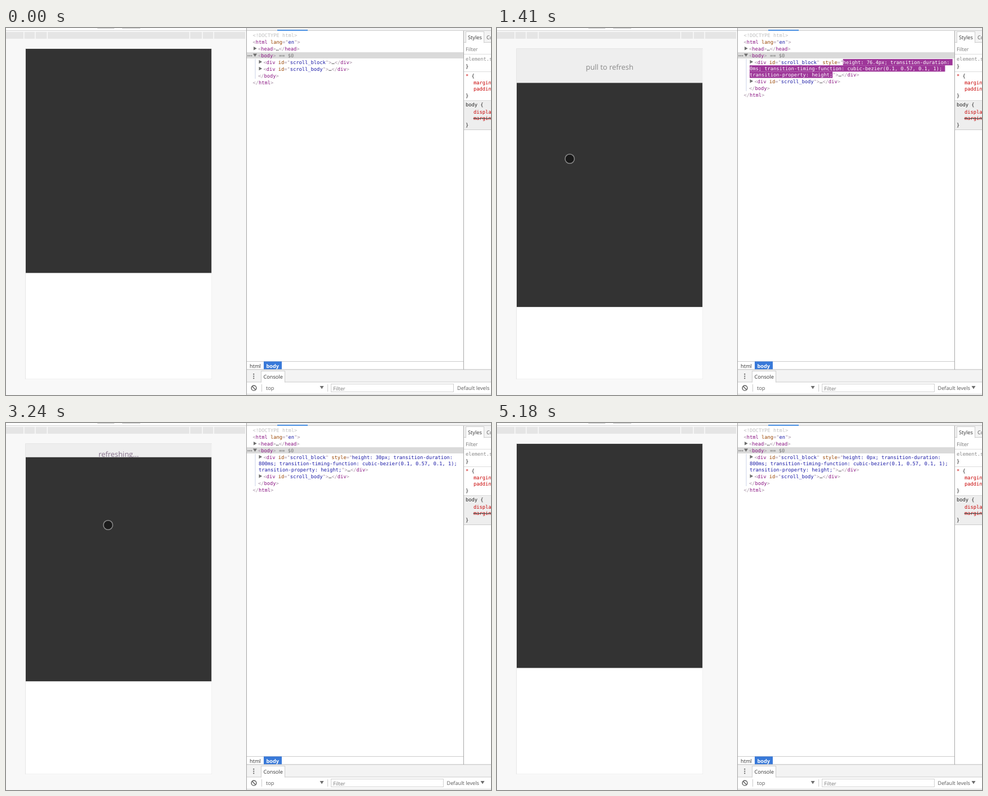
Recreate the animation shown at these times as an HTML page. Size 860 px wide and 651 px high, loop 5240 ms.

```html
<!DOCTYPE html>
<html lang="en">
<head>
<meta charset="utf-8">
<title>Pull to refresh</title>
<style>
html, body { margin: 0; width: 100%; height: 100%; overflow: hidden; background: #fff; }
svg { display: block; width: 860px; height: 651px; }
text { white-space: pre; text-rendering: geometricPrecision; }
.mono { font: 8.72px "DejaVu Sans Mono", monospace; }
.ui { font: 9.2px "Open Sans", "Noto Sans", sans-serif; fill: #5a5a5a; }
.note { font: 12.9px "Open Sans", "Noto Sans", sans-serif; text-anchor: middle; }
</style>
</head>
<body>
<svg id="stage" viewBox="0 0 860 651"></svg>
<script>
const LOOP = 5240;
const CELL = 5.25;
const SCALE = 0.79;
const TOP = 37;
const BODY = 397.5;
const PUNCT = '#a894a6', TAG = '#881280', ATTR = '#994500', VALUE = '#1a1aa6', DARK = '#303030';

// ---------- drawing helpers ----------
const esc = s => s.replace(/&/g, '&amp;').replace(/</g, '&lt;').replace(/>/g, '&gt;');
const rect = (x, y, w, h, fill, more = '') =>
  `<rect x="${x}" y="${y}" width="${w}" height="${h}" fill="${fill}" ${more}/>`;
const ui = (x, y, s, more = '') => `<text class="ui" x="${x}" y="${y}" ${more}>${esc(s)}</text>`;
const span = ([color, s]) => `<tspan fill="${color}">${esc(s)}</tspan>`;
const code = (x, y, parts, more = '') =>
  `<text class="mono" x="${x}" y="${y}" ${more}>${parts.map(span).join('')}</text>`;
const right = (x, y) => `<path d="M${x} ${y - 3.2}l5.6 3.2l-5.6 3.2z" fill="#6e6e6e"/>`;
const down = (x, y, w = 7, h = 5.5) => `<path d="M${x} ${y}h${w}l${-w / 2} ${h}z" fill="#6e6e6e"/>`;

const open = (name, attr, value) => [
  [PUNCT, '<'], [TAG, name],
  ...(attr ? [[ATTR, ' ' + attr], [PUNCT, '="'], [VALUE, value], [PUNCT, '"']] : []),
  [PUNCT, '>']
];
const close = name => [[PUNCT, '</'], [TAG, name], [PUNCT, '>']];
const folded = (name, attr, value) => [...open(name, attr, value), [DARK, '…'], ...close(name)];

// ---------- static interface ----------
function devicePane() {
  const gaps = [31, 51, 72.5, 325, 347.5, 367.5];
  return rect(0, 0, 426, 651, '#f8f8f8') +
    rect(0, 0, 426, 4, '#fdfdfd') + rect(0, 4, 426, 1, '#d6d6d6') +
    rect(162, 0, 30, 1, '#c4c4c4') + rect(206, 0, 32, 1, '#c4c4c4') +
    rect(0, 7, 424, 12, '#e5e5e5') +
    gaps.map(x => rect(x, 7, 1.5, 12, '#fafafa')).join('') +
    rect(34, 36, 331, 587, '#e6e6e6') +
    rect(35, TOP, 329.5, 585.5, '#fff');
}

function stylesPane() {
  const rule = (x, y, s, color) => code(x, y, [[color, s]]);
  const red = '#c80000', gray = '#888', ink = '#222';
  return rect(811, 5, 49, 601, '#fff') +
    rect(812, 5, 48, 20.5, '#f3f3f3') + rect(812, 25, 48, 1, '#ccc') +
    rect(815.5, 6.5, 32, 19.5, '#fff', 'stroke="#ccc"') + rect(816, 25, 31, 2, '#fff') +
    ui(819, 20, 'Styles', 'style="fill:#333"') + ui(852, 20, 'Computed') +
    ui(815, 40.5, 'Filter', 'style="fill:#777"') + rect(812, 46, 48, 1, '#ddd') +
    rule(815, 58, 'element.style {', gray) + rule(815, 71, '}', ink) + rect(812, 77, 48, 1, '#ddd') +
    rule(815, 88, '*', red) + rule(825.5, 88, '{', ink) +
    rule(829, 100, 'margin:', red) + rule(829, 111, 'padding:', red) + rule(815, 122.5, '}', ink) +
    rect(812, 128, 48, 52, '#eee') + rect(812, 128, 48, 1, '#ddd') + rect(812, 180, 48, 1, '#ccc') +
    rule(815, 139, 'body {', ink) + rule(829, 152, 'display:', red) +
    rule(829, 163, 'margin:', red) + rect(828.5, 160, 32, 1, '#333') + rule(815, 174.5, '}', ink) +
    rect(811, 5, 1, 601, '#a8a8a8');
}

function toolsPane() {
  return rect(426, 0, 434, 651, '#fff') +
    rect(427, 0, 433, 4, '#f3f3f3') + rect(427, 4, 433, 1, '#ccc') + rect(481, 3, 54, 2, '#4a90e2') +
    rect(427, 43, 384, 11, '#dadada') +
    [429.5, 432.5, 435.5].map(x => rect(x - 1, 48.5, 1.6, 1.6, '#666')).join('') +
    code(437.5, 16, [['#c0c0c0', '<!DOCTYPE html>']]) +
    code(437.5, 28, open('html', 'lang', 'en')) +
    right(439, 36.3) + code(447, 40, folded('head')) +
    down(438, 45.5) + code(447, 51.5, open('body')) +
    code(484, 51.5, [['#777', '== $0']], 'font-style="italic"') +
    stylesPane() +
    rect(427, 591, 384, 1, '#ccc') + ui(432, 602.5, 'html', 'style="fill:#333"') +
    rect(457, 591.5, 32, 14, '#3879d9') +
    ui(461.5, 602.5, 'body', 'style="fill:#fff;font-weight:700"') +
    rect(427, 605.5, 433, 1, '#a3a3a3') + rect(427, 606.5, 433, 21.5, '#f3f3f3') +
    rect(427, 627.5, 433, 1, '#ccc') +
    [613, 616.7, 620.4].map(y => rect(438.3, y, 1.9, 1.9, '#5a5a5a')).join('') +
    rect(452.5, 608.5, 42, 19.5, '#fff', 'stroke="#ccc"') + rect(453, 627, 41, 2, '#fff') +
    ui(456.5, 621.5, 'Console', 'style="fill:#333"') +
    '<g fill="none" stroke="#5a5a5a" stroke-width="1.4"><circle cx="439.5" cy="638.7" r="4.4"/><path d="M436.4 635.6l6.2 6.2"/></g>' +
    rect(453, 632, 1, 13, '#ccc') + ui(461, 642, 'top') + down(556.5, 635) +
    rect(570, 632, 1, 13, '#ccc') + rect(427, 649, 433, 1, '#d0d0d0') +
    rect(426, 0, 1, 651, '#a3a3a3');
}

const guide = h => rect(441.5, 55, 1, h, '#cbd3ea');
const filterBox = w =>
  rect(576.5, 631.5, w, 14, '#fff', 'stroke="#d0d0d0"') + ui(580, 642.5, 'Filter', 'style="fill:#777"');

function plainTree() {
  return guide(35) +
    right(448.5, 60) + code(456.5, 63.5, folded('div', 'id', 'scroll_block')) +
    right(448.5, 72) + code(456.5, 75.5, folded('div', 'id', 'scroll_body')) +
    code(447, 87.5, close('body')) + code(437.5, 99.5, close('html')) +
    filterBox(217) + ui(800, 642, 'Default levels');
}

function styledTree() {
  const head = [...open('div', 'id', 'scroll_block').slice(0, -1), [ATTR, ' style'], [PUNCT, '="']];
  const tail = [[PUNCT, '">'], [DARK, '…'], ...close('div')];
  const line = (i, x, y) => rect(x, y - 8.5, 0, 11.2, 'none', `id="mark${i}"`) +
    `<text class="mono" id="line${i}" x="${x}" y="${y}"></text>`;
  return guide(57) +
    right(448.5, 60) + code(456.5, 63.5, head) +
    line(0, 613.5, 63.5) + line(1, 448, 74.7) + line(2, 448, 85.9) +
    code(448 + 28 * CELL, 85.9, tail) +
    right(448.5, 94.3) + code(456.5, 98, folded('div', 'id', 'scroll_body')) +
    code(447, 110, close('body')) + code(437.5, 121.5, close('html')) +
    filterBox(199) + ui(781.5, 642, 'Default levels') + down(841.5, 635);
}

document.getElementById('stage').innerHTML =
  '<clipPath id="screen"><rect x="35" y="37" width="329.5" height="585.5"/></clipPath>' +
  devicePane() +
  '<g clip-path="url(#screen)">' +
  rect(35, TOP, 329.5, 0, '#eee', 'id="block"') +
  '<text class="note" id="note" x="199.7"></text>' +
  rect(35, TOP, 329.5, BODY, '#333', 'id="page"') + '</g>' +
  toolsPane() +
  `<g id="plain">${plainTree()}</g><g id="styled">${styledTree()}</g>` +
  '<circle id="touch" r="8.3" fill="#141414" fill-opacity=".75" stroke="#8a8a8a" stroke-width="1.5"/>' +
  '<path id="arrow" d="M0 0v15l3.5-3.2l2.4 5.4l2.2-1l-2.4-5.2h4.8z" fill="#fff" stroke="#000" stroke-width=".9"/>';

// ---------- motion ----------
const spread = (a, b, n) => Array.from({ length: n }, (_, i) => a + (b - a) * i / (n - 1));

const TICKS = [
  0, ...spread(70, 540, 7), 600, 650, 810, ...spread(1060, 1410, 6), 1540, 1680,
  ...spread(1820, 1960, 4), 2140, 2210, 2390, 2550, 2650, 2880, 3180, 3240,
  3730, 3820, 3900, 4000, ...spread(4160, 4660, 8), 4830, 4950, 5130, 5180
];

// pointer path: time, x, y
const PATH = [
  [70, 728, 634], [540, 119, 89], [600, 109, 82], [650, 103, 77], [1000, 103, 77],
  [1410, 129, 232], [1540, 149, 211], [1680, 181, 181], [4080, 181, 181], [4600, 726, 628]
];

const RELEASE = 1680, FINISH = 3635, GLIDE = 800, FLASH = 1400;
const clamp = v => Math.max(0, Math.min(1, v));
const mix = (a, b, k) => a + (b - a) * k;
const rgb = (a, b, k) => `rgb(${a.map((v, i) => Math.round(mix(v, b[i], k))).join()})`;

function bezier(x1, y1, x2, y2) {
  const at = (a, b, u) => 3 * (1 - u) ** 2 * u * a + 3 * (1 - u) * u * u * b + u ** 3;
  return x => {
    let lo = 0, hi = 1;
    for (let i = 0; i < 24; i++) {
      const mid = (lo + hi) / 2;
      if (at(x1, x2, mid) < x) lo = mid; else hi = mid;
    }
    return at(y1, y2, lo);
  };
}
const glide = bezier(0.1, 0.57, 0.1, 1);
const ease = bezier(0.25, 0.1, 0.25, 1);

function pointer(t) {
  let i = PATH.findIndex(p => p[0] > t);
  if (i < 0) i = PATH.length;
  const a = PATH[Math.max(0, i - 1)], b = PATH[Math.min(PATH.length - 1, i)];
  const k = b[0] === a[0] ? 0 : (t - a[0]) / (b[0] - a[0]);
  return [mix(a[1], b[1], k), mix(a[2], b[2], k)];
}

function blockHeight(t) {
  const pulled = (pointer(Math.min(t, 1410))[1] - 77) * 76.4 / 155;
  if (t < 1000) return 0;
  if (t < RELEASE) return pulled;
  if (t < FINISH) return mix(76.4, 30, glide(clamp((t - RELEASE) / GLIDE)));
  return mix(30, 0, glide(clamp((t - FINISH) / GLIDE)));
}

// ---------- rendering ----------
const el = {};
document.querySelectorAll('[id]').forEach(n => el[n.id] = n);
const set = (n, attrs) => { for (const k in attrs) n.setAttribute(k, attrs[k]); };
const show = (n, on) => set(n, { visibility: on ? 'visible' : 'hidden' });

function drawStyle(t, h) {
  const [size, wait, since] =
    t < 1820 ? [+h.toFixed(1), '0ms', Math.min(t, 1540)] :
    t < 3780 ? [30, '800ms', 1820] : [0, '800ms', 3780];
  const lines = [
    `height: ${t < 1820 ? +(blockHeight(Math.min(t, 1540))).toFixed(1) : size}px; transition-duration: `,
    `${wait}; transition-timing-function: cubic-bezier(0.1, 0.57, 0.1, 1); `,
    'transition-property: height;'
  ];
  const p = clamp((t - since) / FLASH);
  const k = ease(clamp(p / 0.8));
  const opacity = 1 - ease(clamp((p - 0.8) / 0.2));
  lines.forEach((s, i) => {
    const mark = el['mark' + i], line = el['line' + i];
    set(mark, {
      width: s.length * CELL,
      fill: rgb([158, 54, 153], [245, 219, 244], k),
      'fill-opacity': opacity
    });
    line.textContent = s;
    set(line, { fill: rgb([255, 255, 255], [26, 26, 166], k), 'font-weight': k < 0.3 ? 700 : 400 });
  });
}

function render(time) {
  const t = TICKS.filter(v => v <= time).pop();
  const h = blockHeight(t), px = h * SCALE;

  set(el.block, { height: px });
  set(el.page, { y: TOP + px });
  const waiting = t < RELEASE;
  el.note.textContent = waiting ? 'pull to refresh' : 'refreshing...';
  set(el.note, { y: TOP + px / 2 + (waiting ? 7.3 : 10.75), fill: waiting ? '#888' : '#85708a' });
  show(el.note, h > 5);

  const styled = t >= 1060;
  show(el.plain, !styled);
  show(el.styled, styled);
  if (styled) drawStyle(t, h);

  const [x, y] = pointer(t);
  const seen = t >= 70 && t < 4660;
  const inside = x > 35 && x < 364 && y > TOP && y < 622;
  show(el.touch, seen && inside);
  show(el.arrow, seen && !inside);
  set(el.touch, { cx: x, cy: y, 'fill-opacity': t >= 810 && t < RELEASE ? 0.82 : 0.75 });
  set(el.arrow, { transform: `translate(${x} ${y})` });
}

const begin = performance.now();
function loop() {
  render((performance.now() - begin) % LOOP);
  requestAnimationFrame(loop);
}
loop();
</script>
</body>
</html>
```
